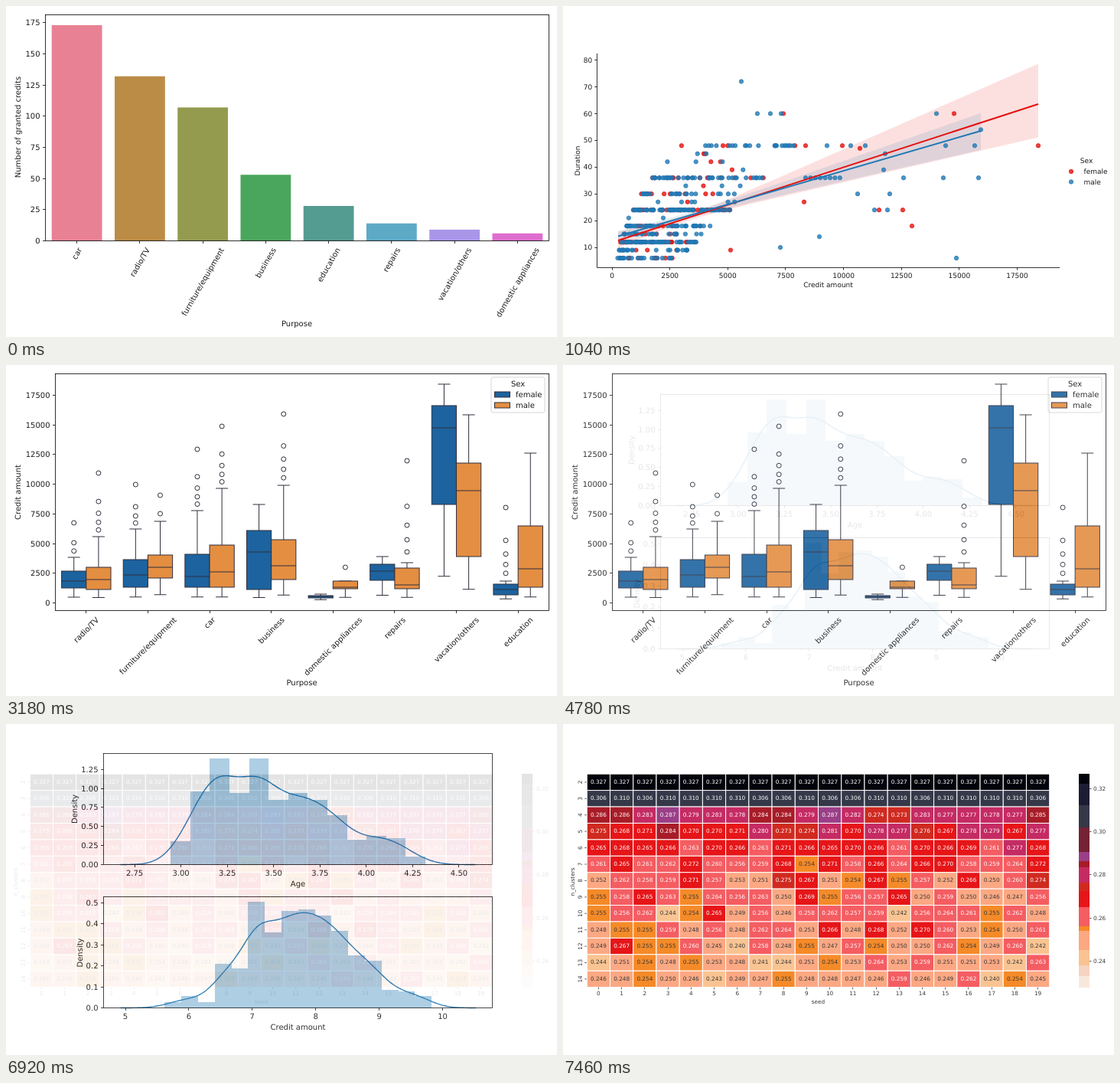
An HTML page that plays this animation: 720x432 px, repeating every 8 s.

```html
<!DOCTYPE html>
<html lang="en">
<head>
<meta charset="utf-8">
<title>Credit data charts</title>
<style>
  html, body { margin: 0; width: 100%; height: 100%; overflow: hidden; background: #fff; }
  svg { display: block; width: 720px; height: 432px; }
  text { font-family: "DejaVu Sans", Verdana, sans-serif; text-rendering: geometricPrecision; }
</style>
</head>
<body>
<svg id="stage" viewBox="0 0 720 432"></svg>
<script>
const measure = document.createElement('canvas').getContext('2d');
measure.font = '10px "DejaVu Sans", Verdana, sans-serif';

// ---- drawing helpers: each returns SVG markup ----
const range = (count, make) => Array.from({ length: count }, (_, i) => make(i));
const clamp = (v, low, high) => Math.max(low, Math.min(high, v));
const snap = v => Math.floor(v) + 0.5;
const rect = (x, y, w, h, fill, extra = '') =>
  `<rect x="${x}" y="${y}" width="${w}" height="${h}" fill="${fill}" ${extra}/>`;
const line = (x1, y1, x2, y2, color = '#000', width = 0.8) =>
  `<path d="M${x1} ${y1}L${x2} ${y2}" stroke="${color}" stroke-width="${width}"/>`;

// y is the middle of the capital letters
const text = (label, x, y, { size = 10, anchor = 'middle', rotate = 0, fill = '#1c1c1c', extra = '' } = {}) =>
  `<text transform="translate(${x} ${y}) rotate(${rotate})" y="${size * 0.35}" font-size="${size}"
    text-anchor="${anchor}" fill="${fill}" ${extra}>${label}</text>`;

const slanted = (label, x, top, angle) => {
  const a = angle * Math.PI / 180;
  const height = measure.measureText(label).width * Math.sin(a) + 11 * Math.cos(a);
  return text(label, x, top + height / 2, { rotate: -angle });
};

const ticks = (count, first, step, start, gap, digits = 0) =>
  range(count, i => [start + i * gap, (first + i * step).toFixed(digits)]);

function axes(left, top, right, bottom, { xs = [], ys = [], size = 10, open = false }) {
  const len = size * 0.35;
  let out = open
    ? line(left, top, left, bottom) + line(left, bottom, right, bottom)
    : rect(left, top, right - left, bottom - top, 'none', 'stroke="#000" stroke-width=".8"');
  for (const [x, label] of xs) {
    out += line(snap(x), bottom, snap(x), bottom + len);
    if (label) out += text(label, x, bottom + size * 1.1, { size });
  }
  for (const [y, label] of ys) {
    out += line(left - len, snap(y), left, snap(y));
    out += text(label, left - 2 * len, y, { size, anchor: 'end' });
  }
  return out;
}

function randomizer(seed) {
  return () => {
    seed = (seed * 1664525 + 1013904223) >>> 0;
    return seed / 4294967296;
  };
}

// ---- charts ----
function purposeBars() {
  const bars = [
    ['car', 173, '#e88193'], ['radio/TV', 132, '#bb8c46'],
    ['furniture/equipment', 107, '#949b4e'], ['business', 53, '#4aa65c'],
    ['education', 28, '#549b92'], ['repairs', 14, '#5daac7'],
    ['vacation/others', 9, '#a996e9'], ['domestic appliances', 6, '#de6ece'],
  ];
  const center = i => 51.5 + 82.25 * (i + 0.5);
  return bars.map(([label, value, color], i) =>
      rect(center(i) - 32.9, 306.5 - value * 1.627, 65.8, value * 1.627, color) +
      slanted(label, center(i), 313.5, 60)).join('') +
    axes(51.5, 11.5, 709.5, 306.5, {
      xs: bars.map((_, i) => [center(i)]),
      ys: ticks(8, 0, 25, 306.5, -40.67),
    }) +
    text('Purpose', 380, 414.5) +
    text('Number of granted credits', 15.5, 158, { rotate: -90 });
}

function durationScatter() {
  const colors = { female: '#e3120f', male: '#1f78b4' };
  const dots = { female: '', male: '' };
  const dot = (sex, x, y) => `<circle cx="${x.toFixed(1)}" cy="${y.toFixed(1)}" r="2.7" fill="${colors[sex]}"
    stroke="${colors[sex]}" stroke-width=".9" fill-opacity=".8" stroke-opacity=".8"/>`;
  const add = (sex, x, months) => { dots[sex] += dot(sex, x, 350 - months * 3.493); };

  // Common durations repeat; 0 stands for any multiple of three. Longer credits are larger.
  const common = [6, 9, 12, 12, 12, 15, 18, 18, 24, 24, 24, 24, 30, 36, 36, 48, 0, 0];
  const random = randomizer(11);
  for (let i = 0; i < 450; i++) {
    const months = common[i % common.length] || 3 * Math.floor(2 + random() * 14);
    const from = 70 + 0.036 * months ** 2, to = 130 + 3.7 * months;
    add(random() < 0.31 ? 'female' : 'male', from + (to - from) * random() ** 1.3, months);
  }
  for (let x = 317; x < 365; x += 6.4) add('male', x, 36);

  // dots that stand alone: x, months
  const single = {
    female: [[288, 60], [511, 60], [388, 47], [317, 48], [365, 48], [621, 48], [315, 27],
      [413, 24], [444, 24], [456, 18], [219, 9]],
    male: [[233, 72], [254, 60], [271, 60], [285, 60], [488, 60], [546, 54], [345, 48], [376, 48],
      [395, 48], [500, 48], [538, 48], [421, 45], [419, 39], [445, 36], [497, 36], [543, 36],
      [385, 30], [427, 30], [407, 24], [424, 24], [335, 14], [284, 10], [514, 6]],
  };
  for (const sex in single)
    for (const [x, months] of single[sex]) add(sex, x, months);

  const fit = (sex, y1, x2, y2, above, below) => {
    const y = x => y1 + (y2 - y1) * (x - 72) / (x2 - 72);
    const xs = range(31, i => 72 + (x2 - 72) * i / 30);
    const edge = slope => xs.map(x => [x, y(x) + Math.sign(slope) * Math.hypot(4, slope * (x - 165))]);
    const outline = [...edge(-above), ...edge(below).reverse()];
    return {
      band: `<path d="M${outline.join('L')}Z" fill="${colors[sex]}" fill-opacity=".13"/>`,
      line: line(72, y1, x2, y2, colors[sex], 2),
    };
  };
  const red = fit('female', 306, 621, 128, 0.115, 0.095);
  const blue = fit('male', 300.5, 546, 163, 0.06, 0.064);
  const size = 9;
  return dots.female + red.band + dots.male + blue.band + red.line + blue.line +
    axes(44.5, 62, 649, 341.5, {
      xs: ticks(8, 0, 2500, 64, 75.64), ys: ticks(8, 10, 10, 315, -34.93), size, open: true,
    }) +
    text('Credit amount', 346.5, 364, { size }) +
    text('Duration', 18.5, 202, { size, rotate: -90 }) +
    text('Sex', 684, 202, { size }) +
    dot('female', 664, 216) + text('female', 680.5, 216, { size, anchor: 'start' }) +
    dot('male', 664, 229.5) + text('male', 680.5, 229.5, { size, anchor: 'start' });
}

function amountBoxes() {
  const ink = '#302e3c', blue = '#1c639f', orange = '#e48e41';
  // per sex, as heights on the stage: upper whisker, box top, median, box bottom, farthest outlier
  const groups = [
    ['radio/TV', [251, 269, 282, 291, 206], [224, 264, 280, 293, 141]],
    ['furniture/equipment', [214, 254, 274, 290, 156], [204, 248, 264, 278, 170]],
    ['car', [190, 247, 276, 290, 110], [161, 235, 270, 290, 80]],
    ['business', [182, 216, 244, 293], [157, 228, 262, 280, 64]],
    ['domestic appliances', [299, 301, 302, 304], [282, 282, 290, 292, 264]],
    ['repairs', [250, 260, 269, 281], [258, 265, 287, 292, 125]],
    ['vacation/others', [25, 53, 82, 182], [65, 128, 164, 250]],
    ['education', [282, 286, 293, 300, 186], [115, 210, 266, 290]],
  ];
  const center = i => 64.5 + 80.62 * (i + 0.5);
  const box = (x, color, [high, top, median, bottom, peak = high]) => {
    const low = bottom + (307 - bottom) * 0.75;
    const count = Math.min(5, Math.round((high - peak) / 16));
    return line(x, high, x, top, ink, 1) + line(x, bottom, x, low, ink, 1) +
      line(x - 8, high, x + 8, high, ink, 1) + line(x - 8, low, x + 8, low, ink, 1) +
      rect(x - 16.1, top, 32.2, bottom - top, color, `stroke="${ink}"`) +
      line(x - 16.1, median, x + 16.1, median, ink, 1) +
      range(count, i => `<circle cx="${x}" cy="${peak + (high - peak) * Math.sqrt(i / count)}" r="3"
        fill="none" stroke="${ink}"/>`).join('');
  };
  const key = (y, color, label) =>
    rect(638.5, y - 3.5, 20, 7, color, `stroke="${ink}"`) + text(label, 666, y, { anchor: 'start' });

  return groups.map(([label, female, male], i) =>
      box(center(i) - 16.1, blue, female) + box(center(i) + 16.1, orange, male) +
      slanted(label, center(i), 327, 45)).join('') +
    axes(64.5, 11.5, 709.5, 320.5, {
      xs: groups.map((_, i) => [center(i)]),
      ys: ticks(8, 0, 2500, 310.5, -38.73),
    }) +
    text('Purpose', 386.5, 414.5) +
    text('Credit amount', 15.5, 166, { rotate: -90 }) +
    rect(634, 16, 70, 46, '#fff', 'rx="2" stroke="#ccc" stroke-width=".8"') +
    text('Sex', 669, 24) + key(38.5, blue, 'female') + key(52.5, orange, 'male');
}

function densities() {
  // The curve is the histogram smoothed with a Gaussian kernel.
  const plot = (top, bottom, left, width, bandwidth, heights, scales) => {
    const density = x => heights.reduce((sum, h, i) => {
      const z = (x - left - (i + 0.5) * width) / bandwidth;
      return sum + h * Math.exp(-z * z / 2);
    }, 0) * width / (bandwidth * Math.sqrt(2 * Math.PI));
    const from = left - 3 * bandwidth, to = left + heights.length * width + 3 * bandwidth;
    const curve = range(201, i => from + (to - from) * i / 200)
      .map(x => `${x.toFixed(1)} ${(bottom - density(x)).toFixed(2)}`);
    return heights.map((h, i) => rect((left + i * width).toFixed(1), bottom - h, width, h,
        '#a5c9e1', 'shape-rendering="crispEdges"')).join('') +
      `<path d="M${curve.join('L')}" fill="none" stroke="#1f77b4" stroke-width="1.4"/>` +
      axes(127.5, top, 635.5, bottom, scales);
  };
  const ages = [30.5, 95.5, 139, 93.5, 139, 85, 93.5, 85, 65, 32.5, 38, 34.5, 11];
  const amounts = [7.5, 15.5, 7.5, 58, 52, 138.5, 98.5, 126.5, 128.5, 120.5, 100.5, 68.5, 62, 24, 21.5, 15.5];

  return plot(38.5, 183.5, 215, 25.62, 21.8, ages, {
      xs: ticks(8, 2.75, 0.25, 168, 60.57, 2), ys: ticks(6, 0, 0.25, 183.5, -24.85, 2) }) +
    plot(225.5, 370.5, 207.3, 21.8, 19.2, amounts, {
      xs: ticks(6, 5, 1, 156, 82.9), ys: ticks(6, 0, 0.1, 370.5, -27.5, 1) }) +
    text('Age', 381.5, 208) + text('Credit amount', 381.5, 395.5) +
    text('Density', 89.5, 111, { rotate: -90 }) + text('Density', 96, 298.5, { rotate: -90 });
}

function clusterHeatmap() {
  const size = 7.3, left = 31.3, top = 65.2, cellW = 30.22, cellH = 21.42, fill = '#3a3a3a';
  // lowest score in thousandths for each colour
  const bands = [[322.3, '#03030c'], [312.5, '#1c1c33'], [302, '#353848'], [290.5, '#752235'],
    [286.5, '#9a3f88'], [283.5, '#a81c28'], [276.5, '#c52b63'], [272.5, '#d02a20'],
    [265, '#e61518'], [256, '#f45d62'], [254, '#f58a28'], [245, '#fba883'],
    [238, '#f9c492'], [233, '#f6d3c2'], [227.6, '#f8e8dc']];
  const colorOf = score => bands.find(([low]) => score >= low)[1];

  // Scores settle from 0.28 towards 0.25 and scatter more as clusters are added.
  const random = randomizer(5);
  const scoreOf = clusters => {
    if (clusters === 2) return 327;
    if (clusters === 3) return random() < 0.25 ? 306 : 310;
    const mean = 248 + 34 * Math.exp((4 - clusters) / 4);
    const spread = clusters < 8 ? 11 : 17;
    return Math.round(clamp(mean + spread * (random() + random() - 1), 228, 292));
  };

  const cell = (clusters, seed) => {
    const x = left + seed * cellW, y = top + (clusters - 2) * cellH, score = scoreOf(clusters);
    return rect(x, y, cellW, cellH, colorOf(score), 'stroke="#fff"') +
      text('0.' + score, x + cellW / 2, y + cellH / 2 - 0.6, { size, fill: score < 256 ? fill : '#fff' });
  };
  const row = clusters => {
    const middle = top + (clusters - 1.5) * cellH;
    return line(left - 3, middle, left, middle, fill) +
      text(clusters, 22, middle, { size, fill, rotate: -90 }) +
      range(20, seed => cell(clusters, seed)).join('');
  };

  const barY = score => 84.5 + (320 - score) * 2.81;
  const colorBar = bands.map(([low, color], i) => {
    const from = i ? barY(bands[i - 1][0]) : 65;
    return rect(674, from, 14, barY(low) - from, color, 'shape-rendering="crispEdges"');
  }).join('');

  return range(13, i => row(i + 2)).join('') +
    ticks(20, 0, 1, left + cellW / 2, cellW).map(([x, label]) =>
      line(snap(x), 343.7, snap(x), 346.3, fill) + text(label, x, 351.5, { size, fill })).join('') +
    text('seed', 333.5, 362, { size, fill }) +
    text('n_clusters', 12.5, 206, { size, fill, rotate: -90 }) +
    colorBar +
    ticks(5, 0.24, 0.02, barY(240), -56.2, 2).map(([y, label]) =>
      line(688, snap(y), 690.5, snap(y), fill) +
      text(label, 693, y, { size, fill, anchor: 'start' })).join('');
}

// ---- cross-fades between the stacked charts ----
const LOOP = 8000, FIRST_FADE = 500, FADE_GAP = 2140, STEP = 60, STEPS = 10;
const stage = document.getElementById('stage');
stage.innerHTML = [purposeBars, durationScatter, amountBoxes, densities, clusterHeatmap]
  .map(draw => `<g>${rect(0, 0, 720, 432, '#fff')}${draw()}</g>`).join('');
const layers = [...stage.children];

function render() {
  const time = performance.now() % LOOP;
  const alphas = layers.map((_, i) => {
    if (i === 0) return 1;
    const step = Math.floor((time - FIRST_FADE - (i - 1) * FADE_GAP) / STEP) + 1;
    return clamp(step, 0, STEPS) / STEPS;
  });
  layers.forEach((layer, i) => {
    const hidden = alphas[i] === 0 || alphas[i + 1] === 1;
    layer.setAttribute('opacity', alphas[i]);
    layer.setAttribute('display', hidden ? 'none' : 'inline');
  });
  requestAnimationFrame(render);
}
render();
</script>
</body>
</html>
```
